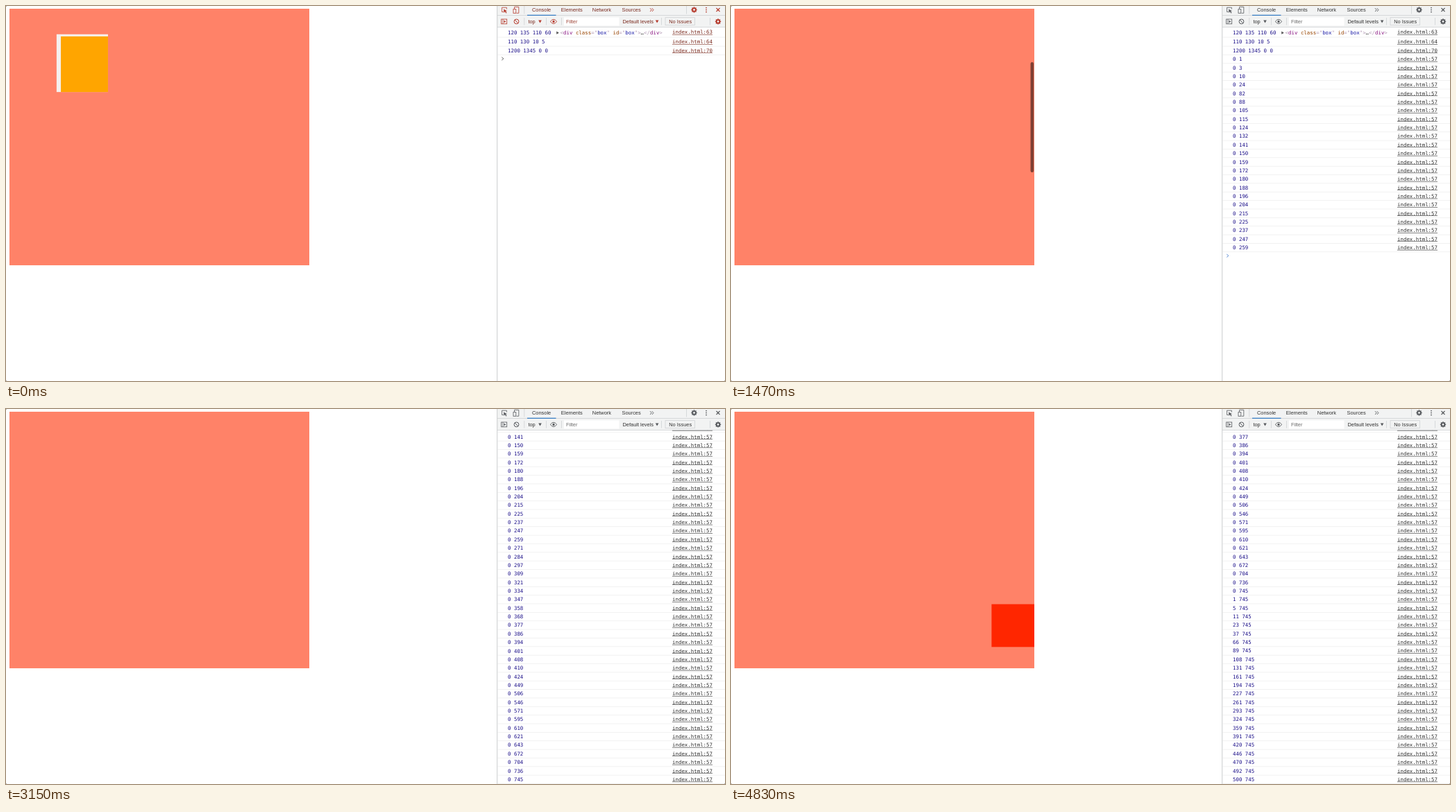
An HTML page with a canvas that plays this animation: 1036x541 px, repeating every 5040 ms.

```html
<!DOCTYPE html>
<html lang="en">
<head>
<meta charset="utf-8">
<title>Scroll logging</title>
<style>
html, body { margin: 0; width: 100%; height: 100%; overflow: hidden; background: #fff; }
canvas { display: block; width: 1036px; height: 541px; }
</style>
</head>
<body>
<canvas id="stage"></canvas>
<script>
const W = 1036, H = 541, LOOP = 5040, STEP = 70;
const S = 0.6175;            // page zoom
const ROW = 12.36;           // console row pitch
const SANS = '"Liberation Sans", Arial, sans-serif';
const MONO = '"DejaVu Sans Mono", monospace';

const canvas = document.getElementById('stage');
const c = canvas.getContext('2d');
const dpr = window.devicePixelRatio || 1;
canvas.width = W * dpr;
canvas.height = H * dpr;

const down = [1, 3, 10, 24, 82, 88, 105, 115, 124, 132, 141, 150, 159, 172, 180, 188, 196,
  204, 215, 225, 237, 247, 259, 271, 284, 297, 309, 321, 334, 347, 358, 368, 377, 386, 394,
  401, 408, 410, 424, 449, 506, 546, 571, 595, 610, 621, 643, 672, 704, 736, 745];
const across = [1, 5, 11, 23, 37, 66, 89, 108, 131, 161, 194, 227, 261, 293, 324, 359, 391,
  420, 446, 470, 492, 500];
const log = [...down.map(y => [0, y]), ...across.map(x => [x, 745])];

// time -> index of the latest scroll event
const keys = [[0, -1], [979, -1], [980, 0], [1076, 0], [1694, 37], [2063, 50],
  [3306, 50], [3673, 72], [LOOP, 72]];

const clamp = v => Math.max(0, Math.min(1, v));

function eventAt(t) {
  for (let i = 1; i < keys.length; i++) {
    const [t0, a] = keys[i - 1], [t1, b] = keys[i];
    if (t <= t1) return a + (b - a) * clamp((t - t0) / (t1 - t0));
  }
  return 72;
}

function scrollAt(t) {
  const e = eventAt(t);
  if (e < 0) return [0, 0];
  const i = Math.floor(e), f = e - i;
  const a = log[i], b = log[Math.min(i + 1, log.length - 1)];
  return [a[0] + (b[0] - a[0]) * f, a[1] + (b[1] - a[1]) * f];
}

function rowsAt(t) {
  const e = eventAt(t - (t < 3000 ? 17 : 60));
  return e < 0.5 ? 0 : Math.floor(e + 1e-6) + 1;
}

// overlay scrollbar opacity: shown from `on`, fading out up to `off`
const barAlpha = (t, on, off) => t < on ? 0 : clamp((off - t) / 320);

function rect(x, y, w, h, color) {
  c.fillStyle = color;
  c.fillRect(x, y, w, h);
}

function text(s, x, y, color, font = SANS) {
  c.font = `7.41px ${font}`;
  c.fillStyle = color;
  c.fillText(s, x, y);
}

function path(points, color, width = 0.9, fill = false) {
  c.beginPath();
  points.forEach(([x, y], i) => i ? c.lineTo(x, y) : c.moveTo(x, y));
  if (fill) {
    c.fillStyle = color;
    c.fill();
  } else {
    c.strokeStyle = color;
    c.lineWidth = width;
    c.stroke();
  }
}

function frame(x, y, w, h, color, width = 0.8) {
  c.strokeStyle = color;
  c.lineWidth = width;
  c.strokeRect(x, y, w, h);
}

function ring(x, y, r, color, width = 1) {
  c.beginPath();
  c.arc(x, y, r, 0, 7);
  c.strokeStyle = color;
  c.lineWidth = width;
  c.stroke();
}

function dot(x, y, r, color) {
  c.beginPath();
  c.arc(x, y, r, 0, 7);
  c.fillStyle = color;
  c.fill();
}

function thumb(x, y, w, h, alpha) {
  if (alpha <= 0) return;
  c.beginPath();
  c.roundRect(x, y, w, h, 2.3);
  c.fillStyle = `rgba(0,0,0,${0.5 * alpha})`;
  c.fill();
}

function gear(x, y, color) {
  for (let i = 0; i < 8; i++) {
    const a = i * Math.PI / 4, u = Math.cos(a), v = Math.sin(a);
    path([[x + u * 2.5, y + v * 2.5], [x + u * 4.2, y + v * 4.2]], color, 1.5);
  }
  ring(x, y, 2.3, color, 1.8);
}

const caret = (x, y, color) =>
  path([[x, y - 2], [x + 4.6, y - 2], [x + 2.3, y + 2]], color, 0, true);

function drawPage(t) {
  const [sx, sy] = scrollAt(t);
  const left = 4.94, top = 3.7, w = 700 * S, h = 600 * S;
  c.save();
  c.beginPath();
  c.rect(left, top, w, h);
  c.clip();
  rect(left, top, w, h, '#ff8268');
  const put = (x, y, bw, bh, color) =>
    rect(left + (x - sx) * S, top + (y - sy) * S, bw * S, bh * S, color);
  put(110, 60, 120, 135, '#f5f0ee');
  put(120, 65, 110, 130, '#ffa500');
  put(1100, 1195, 100, 100, '#ff2600');
  thumb(431.6, 7.1 + sy / 1345 * 356.4, 4.5, 159, barAlpha(t, 1120, 2870));
  thumb(7.2 + sx / 1200 * 418, 368.6, 244, 4.5, barAlpha(t, 3360, 4480));
  c.restore();
}

function link(line, y, color) {
  text('index.html:' + line, 960, y, color, MONO);
  rect(960, y + 0.7, 58, 0.6, color);
}

function drawElement(y) {
  const pale = '#b39ab5', tag = '#881280', attr = '#994500', value = '#1a1aa6';
  const parts = [['<', pale], ['div', tag], [' class', attr], ['="', pale], ['box', value],
    ['"', pale], [' id', attr], ['="', pale], ['box', value], ['"', pale], ['>', pale],
    ['…', '#333'], ['</', pale], ['div', tag], ['>', pale]];
  path([[793.2, y - 4.8], [796.8, y - 2.7], [793.2, y - 0.6]], '#555', 0, true);
  let x = 798.6;
  for (const [s, color] of parts) {
    text(s, x, y, color, MONO);
    x += s.length * 4.461;
  }
}

function drawConsole(t, ink) {
  const n = rowsAt(t);
  const num = '#1c1089', line = '#ececec';
  const scroll = Math.max(0, 76.5 + ROW * (n - 1) - 534.2);
  c.save();
  c.beginPath();
  c.rect(708, 30, W - 708, H - 30);
  c.clip();
  c.translate(0, -scroll);
  const heads = [['120 135 110 60', 41.4, 40.4, 63], ['110 130 10 5', 54.4, 54.4, 64],
    ['1200 1345 0 0', 66.8, 66.8, 70]];
  for (const [s, y, linkY, no] of heads) {
    text(s, 723, y, num, MONO);
    link(no, linkY, ink);
    rect(708, y + 3.3, W - 708, 0.7, line);
  }
  drawElement(41.4);
  for (let i = 0; i < n; i++) {
    const y = 79.2 + ROW * i;
    if (y - scroll < 20 || y - scroll > 560) continue;
    text(log[i].join(' '), 723, y, num, MONO);
    link(57, y, ink);
    rect(708, y + 3.3, W - 708, 0.7, line);
  }
  const py = 76 + ROW * n;
  path([[714.3, py - 2.2], [716.9, py], [714.3, py + 2.2]], t < 1120 ? '#555' : '#4a7fd0', 0.9);
  c.restore();

  if (n > 37) {
    const size = 511 * 511 / (676 + (n - 51) * 13);
    const alpha = t < 3000 ? barAlpha(t, 1680, 2870) : barAlpha(t, 3360, 4480);
    thumb(1030.6, 541 - size, 4.5, size, alpha);
  }
}

function drawToolbar(ink, icon) {
  const rule = '#cbcdd0';
  rect(708, 0, W - 708, 30.4, '#f2f3f3');
  rect(708, 13.3, W - 708, 0.7, rule);
  rect(708, 30, W - 708, 0.7, rule);
  rect(707.3, 0, 0.9, H, '#c4c6c8');

  // tab row
  path([[717, 8.5], [714.6, 8.5], [714.6, 2.2], [721.4, 2.2], [721.4, 4.5]], icon, 0.8);
  path([[717, 4.4], [722.2, 7.2], [720, 7.6], [721.6, 10], [720.5, 10.5], [719.1, 8.3],
    [717.6, 9.8]], icon, 0, true);
  path([[732.5, 4], [732.5, 1.4], [738.8, 1.4], [738.8, 10.3], [735.5, 10.3]], icon, 0.8);
  frame(731, 4.6, 3.8, 5.7, icon);
  rect(746.5, 0, 0.7, 11.5, rule);
  rect(751, 12.7, 41.5, 1.3, '#3b7fc4');
  text('Console', 758, 8.2, ink);
  text('Elements', 799.8, 8.2, ink);
  text('Network', 844.8, 8.2, ink);
  text('Sources', 887.5, 8.2, ink);
  for (const x of [928, 930.8])
    path([[x, 3.2], [x + 2.2, 5.6], [x, 8]], icon, 0.9);
  rect(980, 0, 0.7, 11.5, rule);
  gear(991.5, 5.5, icon);
  for (const y of [2.6, 5.6, 8.6]) dot(1009, y, 0.9, icon);
  path([[1023.5, 3], [1028.5, 8]], icon, 1.1);
  path([[1028.5, 3], [1023.5, 8]], icon, 1.1);

  // filter row
  frame(713.7, 19, 8, 6.8, icon);
  rect(715.6, 19, 0.7, 6.8, icon);
  path([[717.5, 20.5], [720.3, 22.4], [717.5, 24.3]], icon, 0, true);
  ring(735.5, 22.4, 3.4, icon, 1);
  path([[733.2, 20], [737.8, 24.8]], icon, 1);
  for (const x of [746.5, 778.3, 800, 944, 1014]) rect(x, 17, 0.7, 10.5, rule);
  text('top', 752.4, 24.9, ink);
  caret(767.2, 22.4, icon);
  c.beginPath();
  c.moveTo(784.3, 22.4);
  c.quadraticCurveTo(789, 16.2, 793.7, 22.4);
  c.quadraticCurveTo(789, 28.6, 784.3, 22.4);
  c.strokeStyle = icon;
  c.lineWidth = 0.9;
  c.stroke();
  dot(789, 22.4, 1.6, icon);
  rect(804, 16.3, 79.5, 12, '#fff');
  text('Filter', 807, 25.1, ink === '#333' ? '#6c6c6c' : '#a0493c');
  text('Default levels', 888.5, 24.9, ink);
  caret(935.8, 22.4, icon);
  frame(950, 16.7, 42.5, 11, rule, 0.7);
  text('No Issues', 955.2, 24.9, ink);
  gear(1026, 22.4, icon);
}

function draw(t) {
  const warm = t < 1120;
  const ink = warm ? '#7a2a1e' : '#333';
  c.setTransform(dpr, 0, 0, dpr, 0, 0);
  rect(0, 0, W, H, '#fff');
  drawPage(t);
  drawToolbar(ink, warm ? '#b5392b' : '#55585c');
  drawConsole(t, ink);
  for (const [x, y] of [[0, 0], [0, H - 1], [W - 1, H - 1]]) rect(x, y, 1, 1, '#aaa');
}

const start = performance.now();
function tick() {
  const t = (performance.now() - start) % LOOP;
  draw(Math.floor(t / STEP) * STEP);
  requestAnimationFrame(tick);
}
tick();
</script>
</body>
</html>
```
